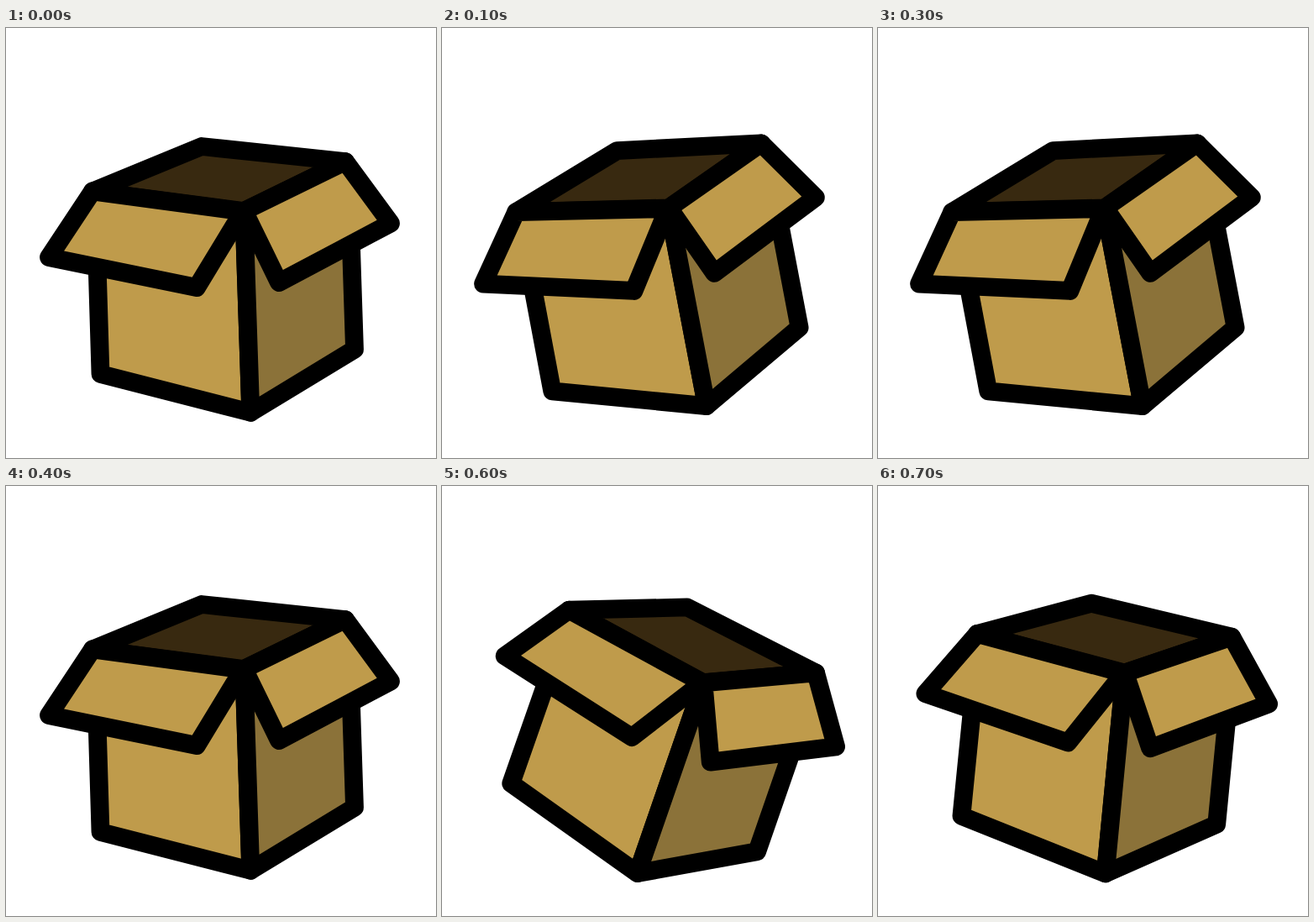
An HTML page for the animation above (0.8 s loop, 512 by 512 pixels).

```html
<!DOCTYPE html>
<html lang="en">
<head>
<meta charset="utf-8">
<title>Rocking box</title>
<style>
  html, body { margin: 0; height: 100%; overflow: hidden; background: #fff; }
  svg { display: block; width: 100%; height: 100%; }
  #box { stroke: #000; stroke-width: 21.8; stroke-linejoin: round; }
  .card { fill: #bf9b4b; }
  .shade { fill: #8b7239; }
  .inside { fill: #382910; }
</style>
</head>
<body>
<svg viewBox="0 0 512 512">
  <g id="box">
    <path class="card" d="M107.6 250L112.5 412L291.3 457.8L283.3 218Z"/>
    <path class="shade" d="M283.3 218L291.3 457.8L415 382.6L410 230Z"/>
    <path class="inside" d="M103 194.5L233 141L404 159L283 218Z"/>
    <path class="card" d="M103 194.5L282 218.5L227 309L51 273Z"/>
    <path class="card" d="M283.5 218L404 159L458 232.5L325 303Z"/>
  </g>
</svg>
<script>
  const STEP = 100;
  const PIVOT = [253.3, 301.5];
  const ANGLES = [0, -8.9, -18.8, -8.9, 0, 7.4, 21, 7.4];
  const box = document.getElementById('box');

  function draw(now) {
    const angle = ANGLES[Math.floor(now / STEP) % ANGLES.length];
    box.setAttribute('transform', `rotate(${[angle, ...PIVOT]})`);
    requestAnimationFrame(draw);
  }
  draw(0);
</script>
</body>
</html>
```
